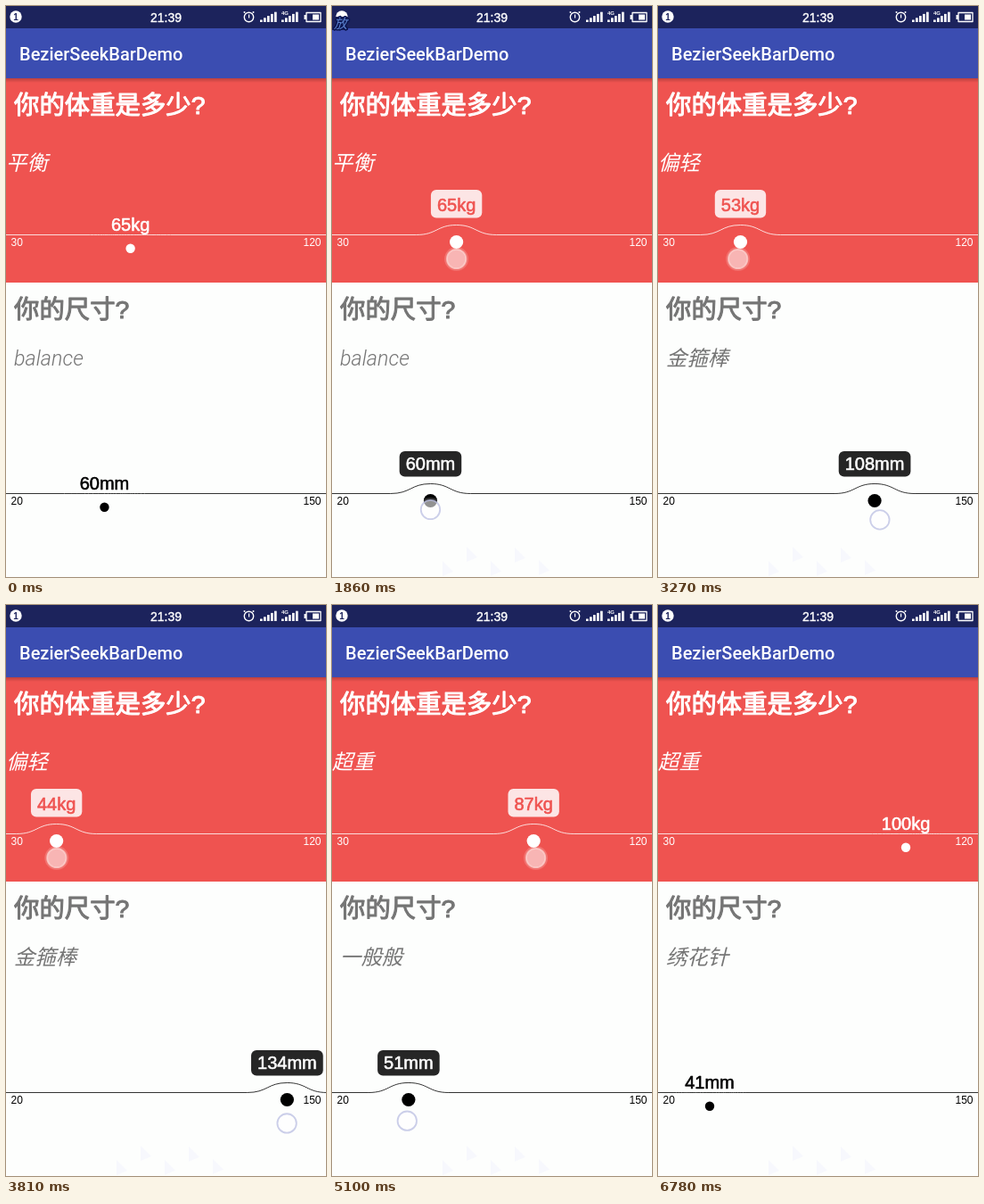
These frames come from a looping animation (359 px wide and 640 px high, 7.65 s). An HTML page with a canvas:

```html
<!DOCTYPE html>
<html lang="zh">
<head>
<meta charset="utf-8">
<style>
  html, body { margin: 0; width: 100%; height: 100%; overflow: hidden; background: #fdfefd; }
  canvas { display: block; width: 359px; height: 640px; }
</style>
</head>
<body>
<canvas id="stage"></canvas>
<script>
const W = 359, H = 640, LOOP = 7650, STEP = 30;
const PRESS = 1590, DRAG = 2490, RELEASE = 6090, FADE = 270;
const WHITE = '#fff', NAVY = '#1c235c', RED = '#ef5350', GREY = '#757575';
const SANS = '"Liberation Sans", Arial, sans-serif';
const CJK = '"Noto Sans CJK SC", "Noto Sans CJK", sans-serif';

const canvas = document.getElementById('stage');
const ratio = window.devicePixelRatio || 1;
canvas.width = W * ratio;
canvas.height = H * ratio;
const ctx = canvas.getContext('2d');
ctx.scale(ratio, ratio);

// Both bars are dragged at once, through these values at these moments.
const moments = [DRAG, 2730, 3810, 4620, 5100, 5900];
const weight = {
  min: 30, max: 120, unit: 'kg', line: 256.5, values: [65, 64, 44.2, 68.9, 86.7, 99.7],
  ink: [255, 255, 255], pressedInk: [239, 83, 80], ring: 'rgba(252,215,212,.7)', reach: 27, sway: 0
};
const size = {
  min: 20, max: 150, unit: 'mm', line: 546.5, values: [60, 69.2, 134.2, 88, 51.1, 41],
  ink: [0, 0, 0], pressedInk: [255, 255, 255], ring: 'rgba(185,190,225,.75)', reach: 18, sway: 18
};

const clamp = v => Math.max(0, Math.min(1, v));
const mix = (a, b, p) => a + (b - a) * p;
const rgb = (c, a = 1) => `rgba(${c.map(Math.round)},${a})`;

// Smooth curve through the values that never overshoots them.
function valueAt({ values }, t) {
  const last = moments.length - 1;
  if (t <= moments[0]) return values[0];
  if (t >= moments[last]) return values[last];
  const rate = i => (values[i + 1] - values[i]) / (moments[i + 1] - moments[i]);
  const slope = i => {
    if (i === 0 || i === last) return 0;
    const a = rate(i - 1), b = rate(i);
    return a * b > 0 ? 2 * a * b / (a + b) : 0;
  };
  const i = moments.findIndex(m => m > t) - 1;
  const d = moments[i + 1] - moments[i], s = (t - moments[i]) / d;
  return mix(values[i], values[i + 1], s * s * (3 - 2 * s))
    + d * s * (1 - s) * (slope(i) * (1 - s) - slope(i + 1) * s);
}

const xAt = (bar, t) => (valueAt(bar, t) - bar.min) / (bar.max - bar.min) * W;

function text(str, x, y, font, color, align = 'left', bold = 0) {
  ctx.font = font;
  ctx.textAlign = align;
  ctx.fillStyle = ctx.strokeStyle = color;
  ctx.fillText(str, x, y);
  if (bold) {
    ctx.lineWidth = bold;
    ctx.lineJoin = 'round';
    ctx.strokeText(str, x, y);
  }
}

function rect(x, y, w, h, color) {
  ctx.fillStyle = color;
  ctx.fillRect(x, y, w, h);
}

function circle(x, y, r, fill, stroke, width = 1) {
  ctx.beginPath();
  ctx.arc(x, y, r, 0, 7);
  if (fill) { ctx.fillStyle = fill; ctx.fill(); }
  if (stroke) { ctx.strokeStyle = stroke; ctx.lineWidth = width; ctx.stroke(); }
}

function signal(x) {
  for (let i = 0; i < 5; i++) rect(x + i * 4, 15.5 - i * 2.2, 2.7, 2.5 + i * 2.2, WHITE);
}

function statusBar(t) {
  rect(0, 0, W, 25, NAVY);
  circle(11, 12, 6.7, WHITE);
  if (t >= 1320 && t < 3000) {
    rect(0, 12, 18, 15, NAVY);
    text('放', 2, 25, 'italic 15px ' + CJK, '#0b1550', 'left', 3);
    text('放', 2, 25, 'italic 15px ' + CJK, '#5c83cf');
  } else {
    text('1', 11, 16, 'bold 10px ' + SANS, NAVY, 'center');
  }
  text('21:39', 179.5, 17.5, '14px ' + SANS, WHITE, 'center', .4);

  circle(272.5, 12.5, 5.2, null, WHITE, 1.4);
  rect(272, 9.5, 1.2, 4, WHITE);
  circle(267.5, 7, 1, WHITE);
  circle(277.5, 7, 1, WHITE);
  signal(285);
  signal(309);
  text('4G', 309, 10, 'bold 6px ' + SANS, WHITE);
  ctx.lineWidth = 1.3;
  ctx.strokeStyle = WHITE;
  ctx.strokeRect(337, 7.5, 16, 10);
  rect(334.5, 10, 2.5, 5, WHITE);
  rect(344, 9.5, 7, 6, WHITE);
}

function seekBar(bar, t, press) {
  const x = xAt(bar, t), y = bar.line, ink = rgb(bar.ink);
  const peak = y - 11 * press;

  ctx.beginPath();
  ctx.moveTo(0, y);
  ctx.lineTo(x - 45, y);
  ctx.bezierCurveTo(x - 22, y, x - 22, peak, x, peak);
  ctx.bezierCurveTo(x + 22, peak, x + 22, y, x + 45, y);
  ctx.lineTo(W, y);
  ctx.strokeStyle = ink;
  ctx.lineWidth = .8;
  ctx.stroke();

  text(bar.min, 5.5, y + 12.5, '12px ' + SANS, ink);
  text(bar.max, 353.5, y + 12.5, '12px ' + SANS, ink, 'right');
  circle(x, mix(y + 15.2, y + 8, press), mix(5.2, 7.6, press), ink);

  const label = Math.round(valueAt(bar, t)) + bar.unit, font = '20px ' + SANS;
  const base = mix(y - 4.5, y - 27, press);
  ctx.font = font;
  const width = ctx.measureText(label).width + 14;
  const top = bar === weight ? 23.5 : 20.5;
  ctx.fillStyle = rgb(bar.ink, .85 * press);
  ctx.beginPath();
  ctx.roundRect(x - width / 2, base - top, width, top + 8, 6);
  ctx.fill();
  const color = rgb(bar.ink.map((c, i) => mix(c, bar.pressedInk[i], press)));
  text(label, x, base, font, color, 'center', .6);
}

// The finger runs slightly ahead of the knob.
function touch(bar, t) {
  if (t <= PRESS || t >= RELEASE) return;
  const x = xAt(bar, t + 27);
  const y = bar.line + bar.reach + bar.sway * Math.sin(Math.PI * clamp((t - DRAG) / (RELEASE - DRAG)));
  circle(x, y, 13.5, 'rgba(255,255,255,.18)');
  circle(x, y, 10.7, 'rgba(255,255,255,.48)', bar.ring, 1.8);
}

// Faint pointer trail near the bottom edge.
function pointerTrail(t) {
  for (let i = 0; i < 5 && t >= 900 - i * 100; i++) {
    const x = 124 + 27 * i, y = 614 + 8 * Math.cos(3 * i);
    ctx.beginPath();
    ctx.moveTo(x, y);
    ctx.lineTo(x, y + 17);
    ctx.lineTo(x + 12, y + 12);
    ctx.fillStyle = '#f7f8fd';
    ctx.fill();
  }
}

function draw(t) {
  const press = clamp((t - PRESS) / FADE) - clamp((t - RELEASE) / FADE);
  const kg = valueAt(weight, t), mm = valueAt(size, t);

  rect(0, 0, W, H, '#fdfefd');
  rect(0, 81, W, 229, RED);
  const shadow = ctx.createLinearGradient(0, 81, 0, 86);
  shadow.addColorStop(0, 'rgba(0,0,0,.22)');
  shadow.addColorStop(1, 'rgba(0,0,0,0)');
  rect(0, 81, W, 5, shadow);
  rect(0, 25, W, 56, '#3b4db1');
  statusBar(t);
  text('BezierSeekBarDemo', 15, 61, '500 20px Roboto, sans-serif', WHITE);

  const heading = '28.4px "Liberation Sans", ' + CJK, note = 'italic 300 23.4px Roboto, ' + CJK;
  text('你的体重是多少?', 9, 121, heading, WHITE, 'left', 1.1);
  text('你的尺寸?', 9, 350, heading, GREY, 'left', 1.1);
  text(kg < 55 ? '偏轻' : kg > 70 ? '超重' : '平衡', 0, 184, note, WHITE);
  text(t <= DRAG ? 'balance' : mm <= 50 ? '绣花针' : mm > 80 ? '金箍棒' : '一般般', 9, 403, note, GREY);

  pointerTrail(t);
  for (const bar of [weight, size]) {
    seekBar(bar, t, press);
    touch(bar, t);
  }
}

const start = performance.now();
function frame() {
  const t = (performance.now() - start) % LOOP;
  draw(Math.floor(t / STEP) * STEP);
  requestAnimationFrame(frame);
}
frame();
</script>
</body>
</html>
```
